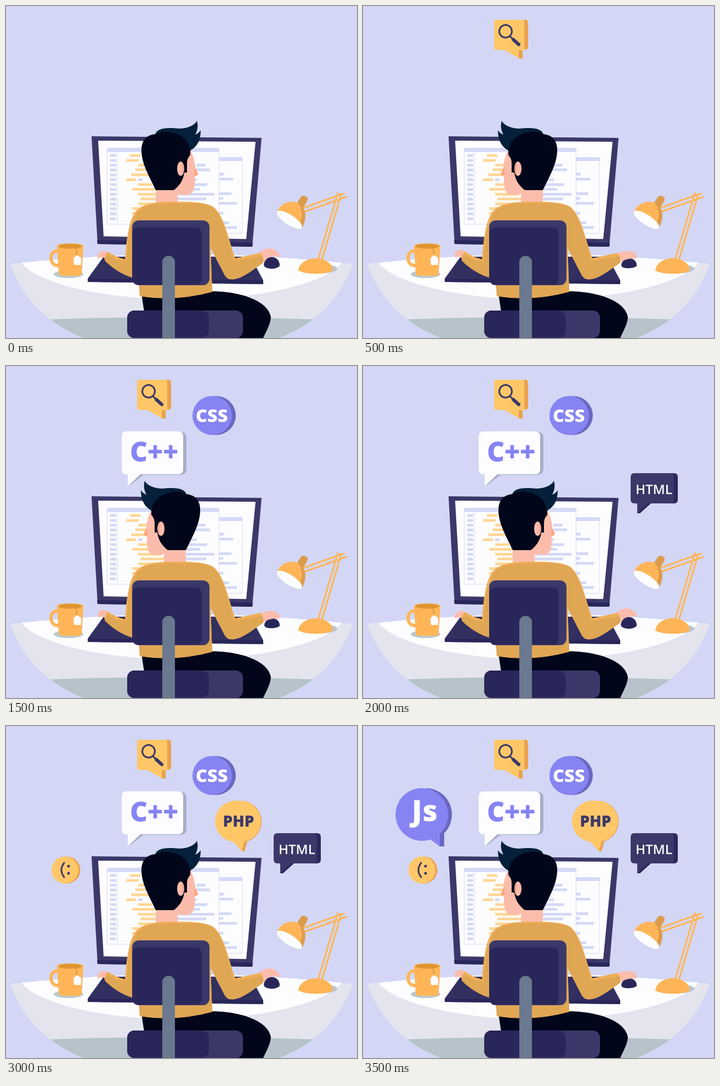
An HTML page for the animation above (4000 ms loop, 640 by 604 pixels).

```html
<!DOCTYPE html>
<html lang="en">
<head>
<meta charset="utf-8">
<title>Coding at the desk</title>
<style>
html, body { margin: 0; width: 100%; height: 100%; overflow: hidden; background: #d3d7f5; }
svg { display: block; width: 100%; height: 100%; }
text { font-family: "Open Sans", sans-serif; font-weight: 800; }

.orange { fill: #ffb557; } .amber { fill: #dfa654; } .glow { fill: #efae56; }
.yellow { fill: #ffc768; } .side { fill: #eaa14e; }
.white { fill: #fdfdff; } .grey { fill: #3b3869; } .navy { fill: #29275a; }
.skin { fill: #fcbcab; } .ink { fill: #02061a; }
.violet { fill: #8684f2; } .plum { fill: #6967c0; } .dusk { fill: #a9adc6; }
.line { fill: none; stroke-linecap: round; }

.turn { animation: turn 1s step-end infinite; }
.first { animation: first 1s step-end infinite; }
.second { animation: second 1s step-end infinite; }
@keyframes turn { 0% { transform: none; } 50%, 100% { transform: translateX(601px) scaleX(-1); } }
@keyframes first { 0% { opacity: 1; } 50%, 100% { opacity: 0; } }
@keyframes second { 0% { opacity: 0; } 50%, 100% { opacity: 1; } }

/* each bubble pops in half a second after the previous one */
.pop { animation: 4s step-end infinite; }
.search { animation-name: pop1; } .css { animation-name: pop2; }
.cpp { animation-name: pop3; } .html { animation-name: pop4; }
.smile { animation-name: pop5; } .php { animation-name: pop6; }
.js { animation-name: pop7; }
@keyframes pop1 { 0% { opacity: 0; } 12.5%, 100% { opacity: 1; } }
@keyframes pop2 { 0% { opacity: 0; } 25%, 100% { opacity: 1; } }
@keyframes pop3 { 0% { opacity: 0; } 37.5%, 100% { opacity: 1; } }
@keyframes pop4 { 0% { opacity: 0; } 50%, 100% { opacity: 1; } }
@keyframes pop5 { 0% { opacity: 0; } 62.5%, 100% { opacity: 1; } }
@keyframes pop6 { 0% { opacity: 0; } 75%, 100% { opacity: 1; } }
@keyframes pop7 { 0% { opacity: 0; } 87.5%, 100% { opacity: 1; } }
</style>
</head>
<body>
<svg viewBox="0 0 640 604" preserveAspectRatio="none">
  <!-- desk -->
  <path fill="#e3e4ee" d="M8 469Q320 436 632 469C616 515 592 545 560 570Q535 590 498 604H142Q105 590 80 570C48 545 24 515 8 469Z"/>
  <path fill="#b6c3cb" d="M81 570Q320 562 560 570Q535 590 498 604H142Q105 590 81 570Z"/>
  <path class="white" d="M28 467Q320 437 612 467C580 508 450 534 320 534S60 508 28 467Z"/>

  <!-- monitor -->
  <path class="grey" d="M156 237L466 240L449 438L167 433Z"/>
  <path class="navy" d="M166 426L450 431L449 438L167 433Z"/>
  <path class="white" d="M168 245L455 247L438 424L178 419Z"/>
  <g fill="none" stroke="#d4d9f5">
    <path d="M389 275.5H431V413.5H389M184.500 258.500H388.500V397H184.500ZM203.500 266V397"/>
    <path stroke-width="7" d="M184 262H389M389 278.500H431"/>
    <path stroke-width="5" d="M190 272h11m-11 9h11m-11 8.500h11m-11 9h11m-11 9h11m-11 8.500h11m-11 9h11m-11 9h11m-11 8.500h11m-11 9h11m-11 9h11m-11 8.500h11m-11 9h11m-11 9h11"/>
    <path stroke-width="5" d="M347 289.500h17M345 298h27M241 316h8M322 316h26M322 325h45M330 333.500h24M290 342.500h90M300 351h65M316 360h29M389 306h8M389 315h25M389 341.500h22M389 350h7M389 359h32M389 377h7M389 394.500h18M389 403h32"/>
  </g>
  <path fill="none" stroke="#ffd797" stroke-width="5" d="M226 272h19M219 281h23M241 289.500h20M236 298h26M228 307h34M219 316h18M241 325h25M230 333.500h42M241 342.500h44M245 351h45M241 360h33M230 368.500h28M230 377h18"/>

  <!-- keyboard -->
  <path fill="#322f61" d="M178 456H446L469 499V506L149 502V496Z"/>
  <path class="navy" d="M149 496L469 499V506L149 502Z"/>

  <!-- mug -->
  <ellipse cx="114" cy="488" rx="27" ry="7" fill="#bdc9cf"/>
  <path class="line" stroke="#ffb557" stroke-width="6" d="M96 446C77 442 77 476 98 472"/>
  <path class="orange" d="M93 437Q93 432 117 432T141 437L138 486Q137 491 130 491H104Q97 491 96 486Z"/>
  <ellipse cx="117" cy="437" rx="21.500" ry="4.500" fill="#df9530"/>
  <path class="line" stroke="#b9843a" d="M127 439Q130 447 129 455"/>
  <path class="white" d="M123 459L129 453L137 458V471L124 471Z"/>

  <!-- lamp -->
  <ellipse cx="577" cy="478" rx="27" ry="8" fill="#b9c6ce"/>
  <g class="line" stroke="#ffb557" stroke-width="3">
    <path d="M543 367L616 341M545 374L621 347M605 340L569 462M611 343L576 462"/>
  </g>
  <path class="orange" d="M533 481C534 468 549 459 565 459S595 468 596 481Q588 487 565 487T533 481Z"/>
  <path fill="#dc9b4c" d="M530 359L538 347Q543 343 549 348Q551 351 549 355L542 367Z"/>
  <path class="orange" d="M494 376C499 361 513 354 528 357C543 361 550 378 540 404Q530 385 494 376Z"/>
  <path fill="#dc9b4c" d="M533 359C548 367 549 385 540 404L535 397C541 383 541 370 533 359Z"/>
  <ellipse class="white" cx="517" cy="389" rx="27" ry="9" transform="rotate(33 517 389)"/>

  <!-- hands and mouse -->
  <g class="first">
    <path class="navy" d="M470 471C471 461 479 456 486 457C494 457 500 465 499 473Q494 478 484 478Q471 477 470 471Z"/>
    <path class="skin" d="M460 450Q470 441 479 441Q490 441 496 448Q501 454 498 457Q492 454 487 456Q477 456 472 464L464 468Z"/>
    <path class="skin" d="M167 459Q166 451 173 447Q179 444 187 448L182 461L177 457Z"/>
  </g>
  <g class="second">
    <path class="navy" d="M471 471C472 463 479 459 486 459C494 459 500 466 499 473Q494 477 484 477Q471 477 471 471Z"/>
    <path class="skin" d="M460 452Q472 446 480 446Q490 445 496 450Q501 456 498 460Q491 458 486 460Q477 461 472 465L464 468Z"/>
    <path class="skin" d="M167 457Q166 448 173 444Q180 442 189 448L182 461L177 456Z"/>
  </g>

  <!-- head -->
  <g class="turn">
    <path class="skin" d="M273 330H313V366H273Z"/>
    <path class="skin" d="M300 270L335 258C341 272 345 283 345 295L350 305Q349 309 344 310C345 325 343 339 336 342Q325 346 311 341L297 334Z"/>
    <path fill="#ffa57c" d="M344 290L345 296L350 305Q348 309 343 309Z"/>
    <path class="ink" d="M273 335C262 311 247 287 247 263C247 244 256 235 272 233C290 219 335 230 336 262L336 271Q330 277 330 286V303H325Q323 322 306 335Z"/>
    <ellipse class="skin" cx="318.500" cy="296" rx="6.500" ry="13"/>
    <path class="line" stroke="#eea08e" stroke-width="2" d="M321 288Q325 296 321 304"/>
    <path fill="#04203a" d="M272 234C274 223 291 220 315 223C331 223 344 217 348 209C351 218 349 227 345 234Q351 232 355 226C355 246 347 257 336 263C334 246 322 234 301 230C289 227 279 229 272 234Z"/>
  </g>

  <!-- body -->
  <path class="ink" d="M247 524L376 519C424 519 478 535 483 566C482 580 474 592 469 604H420L370 570H254Z"/>
  <path class="glow" d="M186 447Q198 456 217 461C220 420 225 386 238 372C252 358 280 356 305 356C335 356 367 356 380 367C399 385 404 420 418 459L464 449Q470 457 469 467C450 480 434 494 416 497Q404 499 399 490L373 440L376 520Q310 538 244 528L242 500L230 494Q202 485 180 463Q179 453 186 447Z"/>
  <path class="amber" d="M184 452Q202 464 220 465C223 423 228 389 241 374C255 360 281 359 306 359C335 359 364 357 378 367C397 385 402 420 416 463Q440 462 468 454L469 467C450 480 434 494 416 497Q404 499 399 490L373 440L376 520Q310 538 244 528L242 500L230 494Q202 485 180 463Z"/>

  <!-- chair -->
  <rect class="grey" x="221" y="554" width="211" height="50" rx="13"/>
  <rect class="navy" x="221" y="554" width="149" height="50" rx="13"/>
  <rect class="grey" x="230" y="390" width="141" height="118" rx="12"/>
  <rect class="navy" x="230" y="403" width="127" height="104" rx="11"/>
  <path fill="#6a798f" d="M285 604V466A11.500 11.500 0 0 1 308 466V604Z"/>

  <!-- bubbles -->
  <g class="pop search">
    <path class="side" d="M246 25H296Q301 25 301 30V75Q301 80 291 80V96L284 95Z"/>
    <path class="yellow" d="M243 25H290Q294 25 294 29V80H284V95L258 80H243Q239 80 239 76V29Q239 25 243 25Z"/>
    <g class="line" stroke="#3b3869">
      <circle cx="260" cy="46" r="11.500" stroke-width="3"/>
      <path stroke-width="3" d="M268 55L274 61"/>
      <path stroke-width="6" d="M274 61L284 70"/>
    </g>
  </g>
  <g class="pop css">
    <ellipse class="plum" cx="383" cy="90" rx="36" ry="35.500"/>
    <ellipse class="violet" cx="376" cy="90" rx="36" ry="35.500"/>
    <text class="white" x="346" y="102" font-size="32.500">CSS</text>
  </g>
  <g class="pop cpp">
    <path class="dusk" d="M225 120H320Q329 121 329 130V187Q329 197 319 198H251L223 219Z"/>
    <path class="white" d="M220 119H314Q323 119 323 128V188Q323 197 314 197H245L222 219V197H220Q211 197 211 188V128Q211 119 220 119Z"/>
    <text class="violet" x="226" y="174" font-size="49.500">C++</text>
  </g>
  <g class="pop html">
    <path class="navy" d="M500 195H567Q574 195 574 202V243Q574 250 567 250H525L505 268H500Z"/>
    <path class="grey" d="M495 195H560Q567 195 567 202V243Q567 250 560 250H520L500 268V250H495Q488 250 488 243V202Q488 195 495 195Z"/>
    <text class="white" x="497" y="233" font-size="24" style="font-weight:600">HTML</text>
  </g>
  <g class="pop smile">
    <circle class="side" cx="111" cy="262" r="24.500"/>
    <circle class="yellow" cx="107.500" cy="262" r="24.500"/>
    <path class="line" stroke="#3b3869" stroke-width="3" d="M106 249Q96 262 106 275"/>
    <circle class="grey" cx="114" cy="255" r="2.500"/><circle class="grey" cx="114" cy="268" r="2.500"/>
  </g>
  <g class="pop php">
    <path class="side" d="M430 136A38 38 0 0 1 440 210L435 228L430 228L420 205Z"/>
    <path class="yellow" d="M424 136A38 37.500 0 0 1 435 210L430 228L415 211A38 37.500 0 0 1 424 136Z"/>
    <text class="grey" x="395.500" y="183" font-size="28">PHP</text>
  </g>
  <g class="pop js">
    <path class="plum" d="M116 113A48 48 0 0 1 148 195V219L140 219L115 200Z"/>
    <path class="violet" d="M108 113A48 48 0 0 1 140 196V219L124 206A48 48 0 1 1 108 113Z"/>
    <text class="white" x="89" y="173" font-size="53">Js</text>
  </g>
</svg>
</body>
</html>
```
